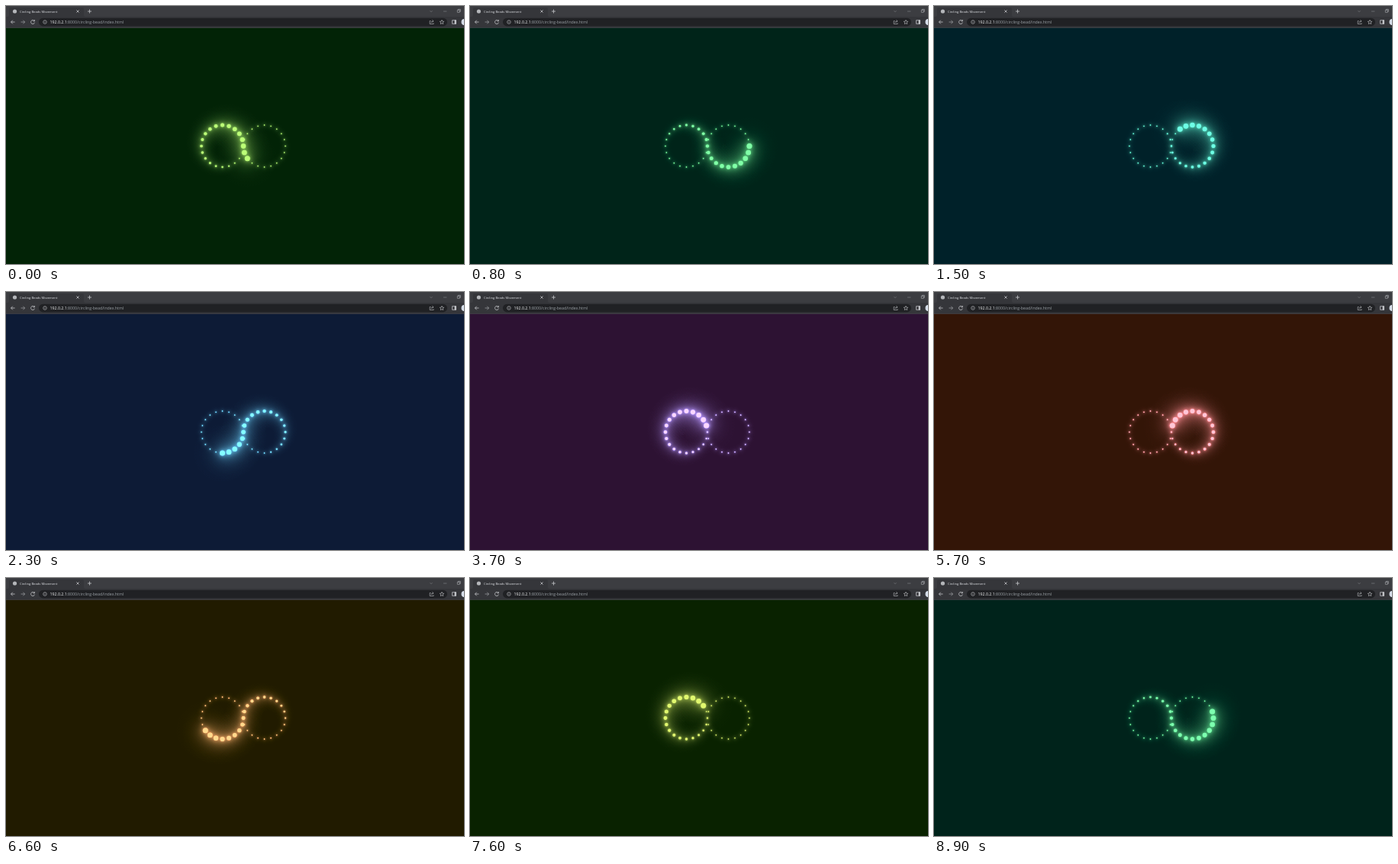
An HTML page for the animation above (9000 ms loop, 600 by 338 pixels).

```html
<!DOCTYPE html>
<html lang="en">
<head>
<meta charset="utf-8">
<title>Circling Beads Movement</title>
<style>
  html, body { margin: 0; width: 100%; height: 100%; overflow: hidden; background: #35363a; }
  svg { position: absolute; left: 0; top: 0; width: 100%; height: 100%; }
  text { font-family: "Open Sans", "Noto Sans", sans-serif; }
  .icon { fill: none; stroke: #c4c6ca; stroke-width: .8; }
  .dim { stroke: #85878b; stroke-width: .6; }
</style>
</head>
<body>
<svg id="page" viewBox="0 0 600 338">
  <defs>
    <radialGradient id="glow"></radialGradient>
  </defs>
  <rect y="28" width="600" height="310" fill="#042304"/>
  <g id="beads"></g>
</svg>

<svg viewBox="0 0 600 338">
  <rect width="600" height="28.5" fill="#35363a"/>
  <rect width="600" height="14" fill="#3c3d41"/>
  <path d="M2 14q2 0 2-2V4q0-2 2-2H100q2 0 2 2v8q0 2 2 2z" fill="#35363a"/>
  <rect y="28" width="600" height=".6" fill="#48494d"/>
  <rect x="43" y="15.8" width="535" height="10.6" rx="5.3" fill="#202124"/>

  <circle cx="11.5" cy="7" r="2.6" fill="#b4b6ba"/>
  <text x="18" y="8.6" font-size="4.2" fill="#dfe1e5">Circling Beads Movement</text>
  <text x="57.5" y="23" font-size="5.25" fill="#9aa0a6"><tspan fill="#f1f3f4">192.0.2.1</tspan>:8000/circling-bead/index.html</text>

  <g class="icon">
    <path d="M92.4 5.4l3.2 3.2m0-3.2l-3.2 3.2M107 7h5m-2.5-2.5v5"/>
    <path d="M11.6 21H6.6m2.2-2.3L6.5 21l2.3 2.3"/>
    <path d="M19.6 21h5m-2.2-2.3l2.3 2.3-2.3 2.3" stroke="#96989c"/>
    <path d="M37 19.4a2.5 2.5 0 1 0 .5 2.2M37.4 18v1.9h-1.9"/>
    <circle cx="51" cy="21" r="2.3" stroke-width=".6"/>
    <path d="M51 20.7v1.4m0-2.6v.6" stroke-width=".6"/>
    <path d="M556.5 19.5h-1.3v4h5v-1.2M556.8 22q.3-2.2 3-2.2m-1.3-1.5l1.6 1.5-1.6 1.5" stroke-width=".6"/>
    <path d="M571 18.3l.8 1.8 2 .2-1.5 1.3.4 2-1.7-1-1.7 1 .4-2-1.5-1.3 2-.2z" stroke-width=".6"/>
    <path d="M584.6 18.7h4.8v4.6h-4.8z"/>
    <path d="M588 18.7h1.4v4.6H588z" fill="#c4c6ca"/>
    <path class="dim" d="M555.5 6.2l1.5 1.5 1.5-1.5M573 7h4.4"/>
    <path d="M591.3 5.3h3v3h-3zM592.3 5.3v-1h3v3h-1" stroke-width=".5"/>
  </g>
  <circle cx="600.5" cy="21" r="4" fill="#d5dde8"/>
</svg>

<script>
  const LOOP = 9000, STEP = 100, HUE_PERIOD = 8000, HUE_START = 6;
  const COUNT = 40, HALF = COUNT / 2, START = 2, FADE = 20;
  const RADIUS = 27.5, CENTER_Y = 183.5, LEFT_X = 283.5, RIGHT_X = 338.5;
  const BIG = 3.5, SMALL = 0.72, GLOW_SIZE = 13;
  const COLOR = "rgb(200,255,115)";

  const page = document.getElementById("page");

  function add(parent, tag, attrs) {
    const node = document.createElementNS("http://www.w3.org/2000/svg", tag);
    for (const key in attrs) node.setAttribute(key, attrs[key]);
    return parent.appendChild(node);
  }

  // Stacked blurred shadows; distance is in bead radii.
  function glowAlpha(distance) {
    const clear = [0.67, 1.33, 2.67, 4, 5.33].reduce((rest, sigma) => {
      const spread = 2 * sigma * sigma;
      return rest * (1 - (1 - Math.exp(-1 / spread)) * Math.exp(-distance * distance / spread));
    }, 1);
    return 1 - clear;
  }

  const gradient = document.getElementById("glow");
  for (let i = 0; i <= 40; i++) {
    const offset = i / 40;
    add(gradient, "stop", {
      offset,
      "stop-color": COLOR,
      "stop-opacity": Math.max(0, glowAlpha(offset * GLOW_SIZE) - glowAlpha(GLOW_SIZE))
    });
  }

  // Right ring runs counter-clockwise, left ring clockwise, both from the crossing.
  function place(index) {
    const angle = (index % HALF) / HALF * 2 * Math.PI;
    const onRight = index < HALF;
    const x = onRight ? RIGHT_X - RADIUS * Math.cos(angle) : LEFT_X + RADIUS * Math.cos(angle);
    return { x, y: CENTER_Y + RADIUS * Math.sin(angle) };
  }

  const layer = document.getElementById("beads");
  const glows = add(layer, "g", { fill: "url(#glow)" });
  const cores = add(layer, "g", { fill: COLOR });
  const beads = Array.from({ length: COUNT }, (_, index) => {
    const { x, y } = place(index);
    return {
      glow: add(glows, "circle", { cx: x, cy: y }),
      core: add(cores, "circle", { cx: x, cy: y })
    };
  });

  function draw(time) {
    const now = Math.floor(time % LOOP / STEP) * STEP;
    const head = START + now / STEP;
    beads.forEach(({ glow, core }, index) => {
      const age = (head - index + COUNT) % COUNT;
      const size = BIG + (SMALL - BIG) * Math.min(1, age / FADE);
      core.setAttribute("r", size);
      glow.setAttribute("r", size * GLOW_SIZE);
    });
    page.style.filter = `hue-rotate(${HUE_START + now / HUE_PERIOD * 360}deg)`;
  }

  function tick() {
    draw(performance.now());
    requestAnimationFrame(tick);
  }
  tick();
</script>
</body>
</html>
```
